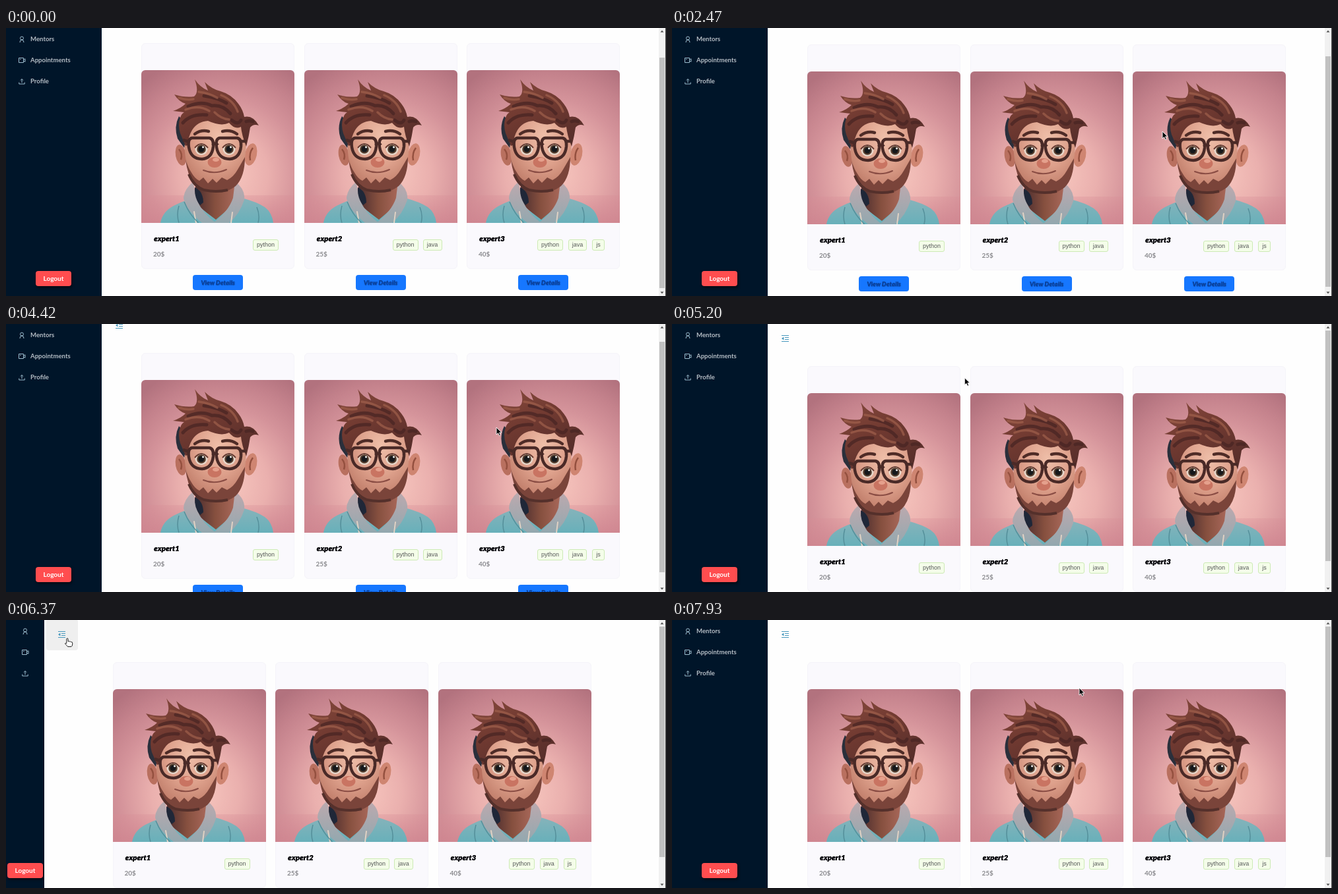
Write an HTML page that moves like this. It is 1000 px wide and 407 px high and loops after 8 s.

```html
<!DOCTYPE html>
<html lang="en">
<head>
<meta charset="utf-8">
<title>Mentors</title>
<style>
  html, body { margin: 0; width: 100%; height: 100%; overflow: hidden; background: #fff; }
  #stage { position: relative; width: 1000px; height: 407px; overflow: hidden; background: #fefefe; font: 700 10px/12px Lato, sans-serif; }
  #stage div, #stage svg, #stage span { position: absolute; box-sizing: border-box; white-space: nowrap; }
  #page { left: 0; top: 0; width: 989px; height: 451px; }
  #toggle { top: -1px; width: 48px; height: 47px; border-radius: 4px; }
  #toggle.hover { background: #efefef; }
  #toggle svg { left: 18px; top: 17px; }
  #cards { top: 64px; }
  .card { top: 0; width: 232px; height: 343px; background: #faf9fd; border: 1px solid #f5f4f9; border-radius: 6px; }
  .card .pic { left: -1px; top: 40px; border-radius: 6px 6px 0 0; }
  .card .name { left: 18px; top: 289px; font: italic 900 11.5px/14px Lato, sans-serif; color: #0a0a0f; text-shadow: .3px 0 #000; }
  .card .price { left: 17px; top: 313px; color: #8a8a8e; }
  .card .tag { top: 297px; height: 17px; border: 1px solid #cdeab5; border-radius: 3px; background: #f4fde9; color: #58595a; font: 9px/15px "Liberation Sans", Arial, sans-serif; text-align: center; }
  .card .view { left: 77px; top: 351px; width: 76px; height: 23px; border-radius: 4px; background: #1677ff; color: #0a3f97; font: italic 900 9.6px/23px Lato, sans-serif; text-align: center; text-shadow: .5px .8px 1px #0b4fb4; }
  #sider { left: 0; top: 0; height: 407px; overflow: hidden; background: #001529; }
  .item { width: 130px; height: 12px; color: #b4bcc4; font-size: 9.6px; }
  .item svg { left: 0; top: 1px; }
  .item span { left: 18px; top: 0; }
  #logout { top: 369px; width: 54px; height: 23px; border-radius: 4px; background: #ff4d4f; color: #fff; line-height: 23px; text-align: center; box-shadow: 1px 2px 4px #000a; }
  #bar { left: 989px; top: 0; width: 10px; height: 407px; background: #f1f1f1; }
  #thumb { left: 1px; width: 8px; height: 350px; background: #c1c1c1; }
  #edge { left: 999px; top: 0; width: 1px; height: 407px; background: #444; }
  #cursor { left: 0; top: 0; overflow: visible; }
</style>
</head>
<body>
<svg width="0" height="0" style="position:absolute">
  <defs>
    <radialGradient id="wall" cx=".54" cy=".68" r=".8">
      <stop offset="0" stop-color="#f9c9c0"/><stop offset=".36" stop-color="#eab0ae"/>
      <stop offset=".62" stop-color="#d4939a"/><stop offset=".82" stop-color="#c4828c"/><stop offset="1" stop-color="#b2727e"/>
    </radialGradient>
    <linearGradient id="floor" x2="0" y2="1">
      <stop offset="0" stop-color="#d78d96" stop-opacity=".3"/><stop offset="1" stop-color="#d08590" stop-opacity=".75"/>
    </linearGradient>
    <radialGradient id="skin" cx=".55" cy=".3" r=".75">
      <stop offset="0" stop-color="#efbfa9"/><stop offset=".5" stop-color="#dda08b"/><stop offset="1" stop-color="#b97562"/>
    </radialGradient>
    <linearGradient id="neck" x2="1">
      <stop offset="0" stop-color="#4a2c2e"/><stop offset=".5" stop-color="#86503f"/><stop offset="1" stop-color="#a9685a"/>
    </linearGradient>
    <linearGradient id="hair" x2=".6" y2="1">
      <stop offset="0" stop-color="#85493c"/><stop offset=".5" stop-color="#713a31"/><stop offset="1" stop-color="#592f2b"/>
    </linearGradient>
    <linearGradient id="cloth" x2="0" y2="1">
      <stop offset="0" stop-color="#86b3ba"/><stop offset="1" stop-color="#68b0ba"/>
    </linearGradient>
    <linearGradient id="hood" x2="0" y2="1">
      <stop offset="0" stop-color="#bda9ae"/><stop offset="1" stop-color="#93a8af"/>
    </linearGradient>
    <symbol id="avatar" viewBox="205 64 232 232">
      <path fill="url(#wall)" d="M205 64h232v232H205z"/>
      <path fill="url(#floor)" d="M205 254h232v42H205z"/>
      <path fill="url(#neck)" d="M286 232H347L348 262 318 294 290 268z"/>
      <path fill="url(#cloth)" d="M234 296Q237 279 254 270Q266 264 277 260L318 291 357 258Q380 264 392 272Q403 280 405 296z"/>
      <path fill="url(#hood)" d="M284 233Q269 246 269 259Q274 278 297 296H318Q297 281 289 260Q285 247 284 233z"/>
      <path fill="url(#hood)" d="M347 233Q363 245 361 261Q354 283 338 296H314Q337 279 344 258z"/>
      <path fill="#1f2738" d="M286 242Q299 248 299 265L294 269Q285 258 286 242z"/>
      <path fill="none" stroke="#e0d2c4" stroke-width="2" stroke-linecap="round" d="M285 279L288 296M343 280L341 296"/>
      <path fill="none" stroke="#548f9a" stroke-width="1.5" d="M262 270Q258 284 262 296M380 272Q385 284 382 296M270 264Q278 284 292 296"/>
      <ellipse cx="265" cy="193" rx="8" ry="16" fill="#b9705f" transform="rotate(-10 265 193)"/>
      <ellipse cx="371" cy="192" rx="9" ry="17" fill="#cf8571" transform="rotate(12 371 192)"/>
      <path fill="none" stroke="#94503f" stroke-width="2.5" d="M262 184Q268 191 265 200M374 182Q368 190 370 201"/>
      <path fill="url(#skin)" d="M271 150Q268 190 276 215Q284 244 317 247Q350 244 358 215Q367 185 362 150Q345 126 300 130z"/>
      <path fill="#7a443a" d="M272 200Q277 214 280 218Q286 229 293 232L299 227 306 236 313 229 319 235 327 227 335 231Q345 226 351 215L362 196Q362 226 348 240Q334 251 318 250Q296 249 285 238Q275 224 272 200z"/>
      <path fill="none" stroke="#54302b" stroke-width="4" d="M277 222Q284 240 300 246Q318 250 336 246"/>
      <path fill="#2a2f3b" d="M262 134Q254 150 260 168L270 182L276 150z"/>
      <path fill="url(#hair)" d="M272 179L264 160Q260 147 264 136Q266 130 270 128L253 126Q265 122 272 115Q262 112 255 101Q271 106 285 104Q293 98 286 78Q294 90 306 95L301 82Q312 93 325 96Q342 101 352 115Q359 124 361 135Q374 132 383 148Q375 145 370 151Q368 165 364 180Q357 162 356 150Q347 155 338 144Q326 150 306 141Q290 142 282 155Q276 165 275 178z"/>
      <g fill="none" stroke-linecap="round">
        <path stroke="#482523" stroke-width="5" stroke-opacity=".75" d="M268 144Q280 130 304 132M276 119Q296 110 312 118Q328 116 340 130M300 103Q321 106 334 114M342 140Q352 148 356 140M364 142Q369 140 374 142"/>
        <path stroke="#a0604c" stroke-width="3.5" stroke-opacity=".7" d="M272 124Q292 116 308 126M292 97Q308 99 320 106M326 102Q345 110 351 127M316 128Q326 138 338 139M262 106Q274 110 284 108"/>
      </g>
      <path fill="none" stroke="#4f2c27" stroke-width="4.5" stroke-linecap="round" d="M286 161Q296 154 307 157M328 157Q340 154 350 161"/>
      <g id="eye">
        <ellipse cx="296" cy="184" rx="9.5" ry="9" fill="#e6d8cc"/>
        <circle cx="296" cy="184" r="6.8" fill="#513b2c"/><circle cx="296" cy="184" r="4.5" fill="#15181b"/>
        <circle cx="298.5" cy="181" r="1.4" fill="#fff"/>
        <path fill="none" stroke="#693c32" stroke-width="2" d="M286 182Q296 170 306 182"/>
        <path fill="none" stroke="#4a2a27" stroke-width="4.5" d="M282 167H308Q315 168 314 180Q312 198 297 199Q280 199 277 181Q275 168 282 167z"/>
      </g>
      <use href="#eye" x="42"/>
      <path fill="none" stroke="#4a2a27" stroke-width="4.5" d="M313 178Q317 173 321 178M278 173L268 170M355 172L364 172"/>
      <ellipse cx="316" cy="204" rx="10.5" ry="8" fill="#c97462"/>
      <ellipse cx="318" cy="200" rx="5" ry="3" fill="#e5a08c"/>
      <path fill="none" stroke="#8a4d44" stroke-width="2" stroke-linecap="round" d="M299 216Q316 223 334 215"/>
    </symbol>
  </defs>
</svg>

<div id="stage">
  <div id="page">
    <div id="toggle">
      <svg width="11" height="12" viewBox="0 0 11 12" fill="none" stroke="#4798bd">
        <path d="M0 1.5H11M5 4.5H11M5 7.5H11M0 10.5H11"/><path fill="#4798bd" stroke="none" d="M0 6L3.4 3.6V8.4z"/>
      </svg>
    </div>
    <div id="cards"></div>
  </div>
  <div id="sider"><div id="logout">Logout</div></div>
  <div id="bar">
    <svg width="10" height="407" fill="#505050"><path d="M5 3.5L7.5 6.5H2.5zM5 403.5L2.5 400.5H7.5z"/></svg>
    <div id="thumb"></div>
  </div>
  <div id="edge"></div>
  <svg id="cursor" width="14" height="16">
    <path id="arrow" fill="#080808" stroke="#fff" stroke-width=".9" d="M0 0V11L2.6 8.7 4.4 12.6 6.4 11.7 4.6 7.9H8z"/>
    <path id="hand" fill="#fff" stroke="#222" stroke-width="1" stroke-linejoin="round" d="M-.7 7V1Q.4-.5 1.5 1V5Q3 4 3.8 5.4Q5.2 4.6 6 5.9Q8 5.2 8.2 7.4V9.5Q8 12 6.5 13H1Q-.5 11-3 8.5Q-2.8 6.8-.7 8z"/>
  </svg>
</div>

<script>
const LOOP = 8000, STEP = 130, OPEN = 145, CLOSED = 58, VIEW = 989;
const $ = id => document.getElementById(id);

const people = [
  { name: 'expert1', price: '20$', tags: [['python', 169, 39]] },
  { name: 'expert2', price: '25$', tags: [['python', 134, 39], ['java', 180, 29]] },
  { name: 'expert3', price: '40$', tags: [['python', 107, 39], ['java', 154, 28], ['js', 190, 19]] }
];
$('cards').innerHTML = people.map((p, i) => `
  <div class="card" style="left:${i * 246.5}px">
    <svg class="pic" width="232" height="232"><use href="#avatar" width="232" height="232"/></svg>
    <div class="name">${p.name}</div><div class="price">${p.price}</div>
    ${p.tags.map(([text, x, w]) => `<div class="tag" style="left:${x - 1}px;width:${w}px">${text}</div>`).join('')}
    <div class="view">View Details</div>
  </div>`).join('');

const menu = [
  ['Mentors', 'M2 10Q2 6 5 6T8 10M5 1A2.4 2.4 0 1 1 5 6A2.4 2.4 0 1 1 5 1'],
  ['Appointments', 'M.5 1.5H7.5V8.5H.5zM7.5 4L10 2.8V7.2L7.5 6M2 3.5H3.5'],
  ['Profile', 'M5 7V1.5M3 3.5L5 1.5 7 3.5M.8 6.5V9H9.2V6.5']
];
$('sider').insertAdjacentHTML('afterbegin', menu.map(([text, icon], i) => `
  <div class="item" style="top:${11 + i * 32}px">
    <svg width="11" height="11" fill="none" stroke="#9dbccd"><path d="${icon}"/></svg><span>${text}</span>
  </div>`).join(''));
const items = [...document.querySelectorAll('.item')];
const labels = items.map(el => el.querySelector('span'));

// Tables of [time, value...]; equal neighbours hold still.
const scrollKeys = [[0, 41], [2340, 41], [2470, 39], [2600, 14], [2730, 0], [3120, 0], [3250, 3],
  [3380, 30], [3510, 41], [4290, 41], [4420, 20], [4550, 0]];
const siderKeys = [[5850, OPEN], [5980, 100], [6110, 63], [6240, CLOSED], [6760, CLOSED], [6890, 84], [7020, 128], [7150, OPEN]];
const labelKeys = [[5850, 1], [5980, .3], [6110, 0], [6760, 0], [7020, .4], [7150, .8], [7280, 1]];
const mouseKeys = [[520, 780, 215], [780, 780, 215], [910, 765, 190], [1430, 765, 190], [1560, 752, 170], [1690, 743, 157],
  [4680, 743, 157], [4940, 670, 135], [5330, 330, 55], [5590, 180, 24], [5720, 172, 20], [5980, 172, 20],
  [6500, 66, 30], [7020, 66, 30], [7150, 65, 30], [7410, 230, 52], [7670, 500, 92], [7800, 590, 101], [7930, 617, 103]];

function track(keys, t) {
  const n = keys.findIndex(k => k[0] > t);
  if (n === 0) return keys[0].slice(1);
  if (n < 0) return keys[keys.length - 1].slice(1);
  const a = keys[n - 1], b = keys[n], f = (t - a[0]) / (b[0] - a[0]);
  return a.slice(1).map((v, i) => v + (b[i + 1] - v) * f);
}

function render(ms) {
  const t = Math.floor(ms % LOOP / STEP) * STEP;
  const [scroll] = track(scrollKeys, t), [width] = track(siderKeys, t);
  const [fade] = track(labelKeys, t), [x, y] = track(mouseKeys, t);
  const left = width + 3;
  const hover = t >= 520 && x > left && x < left + 48 && y < 46 - scroll;

  $('page').style.transform = `translateY(${-scroll}px)`;
  $('thumb').style.top = 10 + scroll * .85 + 'px';
  $('sider').style.width = width + 'px';
  $('toggle').style.left = left + 'px';
  $('toggle').className = hover ? 'hover' : '';
  $('cards').style.left = (width + VIEW) / 2 - 362 + 'px';
  $('logout').style.left = Math.round(width / 2 - 27.5) + 'px';
  items.forEach(el => el.style.left = 19 + 5 * (OPEN - width) / (OPEN - CLOSED) + 'px');
  labels.forEach(el => el.style.opacity = fade);

  $('cursor').style.visibility = t < 520 ? 'hidden' : 'inherit';
  $('cursor').style.transform = `translate(${x}px, ${y}px)`;
  $('arrow').style.display = hover ? 'none' : 'inline';
  $('hand').style.display = hover ? 'inline' : 'none';
}

const start = performance.now();
function tick() {
  render(performance.now() - start);
  requestAnimationFrame(tick);
}
tick();
</script>
</body>
</html>
```
